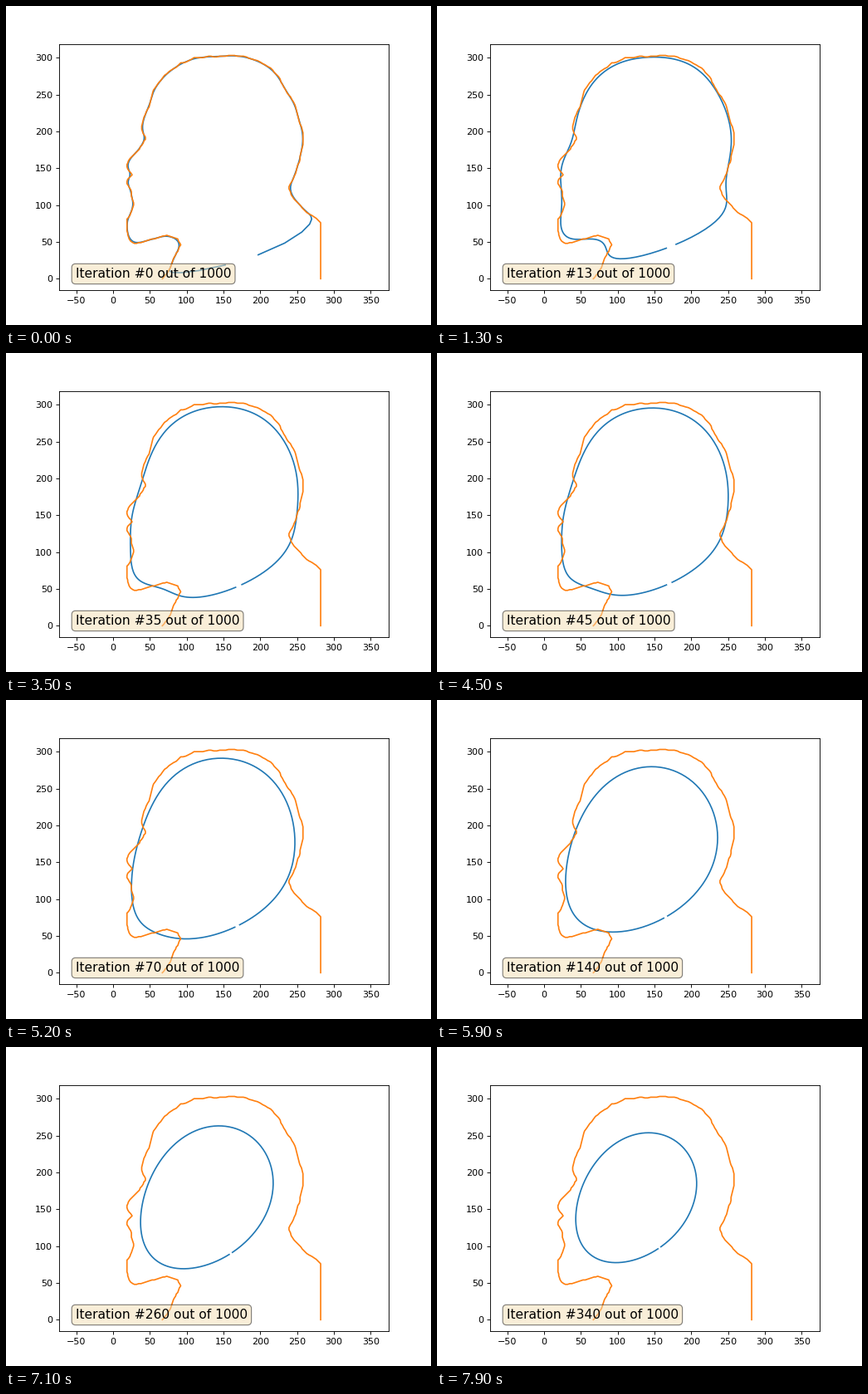
Recreate the animation shown at these times as a matplotlib script. Size 512 px wide and 384 px high, loop 8 s.

```python
import numpy as np
import matplotlib.pyplot as plt
from matplotlib.animation import FuncAnimation

FRAMES = 80
N = 220        # vertices on the curve
RATE = 1.43    # diffusion per iteration
HEAD_START = 1.4

# Corners of the profile: neck, chin, mouth, nose, brow, crown, nape.
CORNERS = np.array([
    67, 0, 77, 13, 81, 25, 86, 34, 92, 46, 88, 54, 81, 57, 73, 59,
    62, 56, 50, 53, 41, 50.5, 30, 47, 23, 52, 19, 64, 19, 80, 25, 90,
    28, 99, 28, 105, 25, 110, 25, 118, 19, 130, 20, 136, 26, 141,
    19, 151, 19, 156, 23, 163, 35, 175, 45, 191, 39, 201, 39, 208,
    44, 224, 50, 235, 54, 254, 61, 265, 70, 276, 78, 283, 87, 288,
    92, 293, 99, 294, 111, 300, 123, 300, 131, 303, 135, 301, 162, 303,
    176, 302, 196, 296, 215, 285, 225, 274, 236, 253, 246, 239, 251, 223,
    258, 196, 258, 183, 253, 160, 246, 138, 238, 124, 245, 109,
    258, 95, 265, 88, 275, 83, 282, 76], float).reshape(-1, 2)


def trace(corners, n):
    """n vertices on whole coordinates, closer together along the face."""
    x, y = (corners[1:] + corners[:-1]).T / 2
    density = np.where((x < 95) & (y < 200), 1.3, 1)
    lengths = np.hypot(*np.diff(corners, axis=0).T) * density
    s = np.concatenate([[0], np.cumsum(lengths)])
    u = np.linspace(0, s[-1], n)
    return np.round(np.interp(u, s, corners[:, 0])
                    + 1j * np.interp(u, s, corners[:, 1]))


outline = np.append(trace(CORNERS, N - 1), 282 + 0j)
modes = np.fft.fft(outline)
decay = RATE * (2 - 2 * np.cos(2 * np.pi * np.arange(N) / N))


def flow_at(it):
    """Closed outline after heat flow over its vertex index."""
    return np.fft.ifft(modes * np.exp(-decay * (it + HEAD_START)))


# Kerning off, so glyphs keep their full advance.
plt.rcParams["text.kerning_factor"] = 6

fig, ax = plt.subplots(figsize=(6.4, 4.8), dpi=80)
ax.set_xlim(-73.14, 374.14)
ax.set_ylim(-15.15, 318.15)
ax.set_xticks(range(-50, 351, 50))
ax.set_yticks(range(0, 301, 50))

flow, = ax.plot([], [], color="C0", solid_capstyle="butt")
ax.plot(outline.real, outline.imag, color="C1")
label = ax.text(0.05, 0.05, "", transform=ax.transAxes, fontsize=14,
                bbox=dict(boxstyle="round", facecolor="wheat", alpha=0.5))


def update(n):
    it = n if n <= 50 else 50 + 10 * (n - 50)
    z = flow_at(it)
    flow.set_data(z.real, z.imag)
    label.set_text(f"Iteration #{it} out of 1000")
    return flow, label


anim = FuncAnimation(fig, update, frames=FRAMES, interval=100, repeat=True)
plt.show()
```
